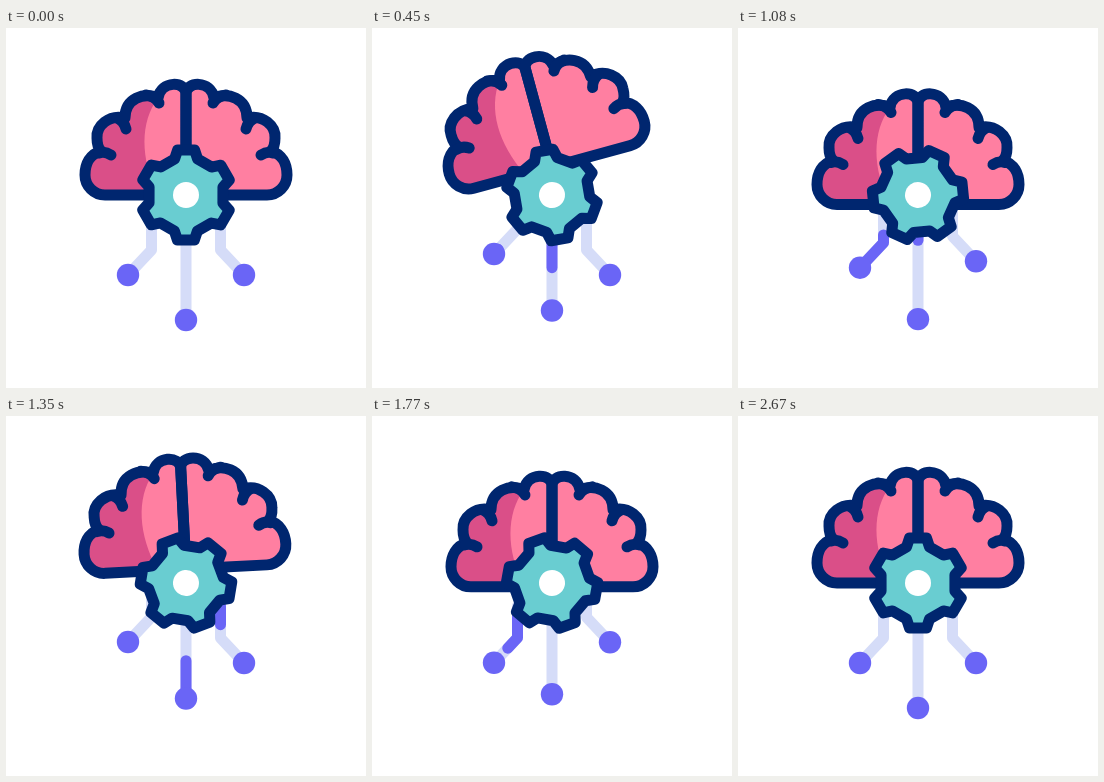
An HTML page that plays this animation: 360 px wide and 360 px high, repeating every 2.7 s.

```html
<!DOCTYPE html>
<html lang="en">
<head>
<meta charset="utf-8">
<title>Thinking brain</title>
<style>
  html, body { margin: 0; width: 100%; height: 100%; overflow: hidden; background: #fff; }
  svg { display: block; width: 100vw; height: 100vh; }
  path { stroke-linecap: round; stroke-linejoin: round; }
  .outline { fill: none; stroke: #00266f; stroke-width: 11; }
  .wire { fill: none; stroke: #d5dcf8; stroke-width: 11; }
  .pulse {
    fill: none; stroke: #6a65f6; stroke-width: 11;
    stroke-dasharray: 40 400; stroke-dashoffset: 45;
    animation: pulse 2700ms linear var(--pulse) infinite;
  }
  .node { fill: #6a65f6; }
  .branch { animation: bob 2700ms cubic-bezier(.37, 0, .63, 1) var(--bob) infinite; }
  .brain, .gear { transform-origin: 180px 167px; }
  .brain {
    animation: hop 2700ms cubic-bezier(.37, 0, .63, 1) infinite,
               tilt 2700ms cubic-bezier(.37, 0, .63, 1) infinite;
  }
  .gear { animation: spin 2700ms linear infinite; }

  @keyframes hop {
    0% { translate: 0 0; }
    20% { translate: 0 -30px; animation-timing-function: cubic-bezier(.6, 0, .6, 1); }
    40% { translate: 0 9.5px; }
    50.5% { translate: 0 -14px; }
    62.5% { translate: 0 4.5px; }
    75%, 100% { translate: 0 0; }
  }
  @keyframes tilt {
    0% { rotate: 0deg; }
    19.5% { rotate: -16deg; }
    30% { rotate: 4.3deg; }
    40% { rotate: 0deg; }
    50% { rotate: -3deg; }
    62%, 100% { rotate: 0deg; }
  }
  @keyframes spin {
    0% { rotate: 0deg; animation-timing-function: cubic-bezier(.4, .25, .7, .65); }
    16.67% { rotate: 110deg; }
    28.89% { rotate: 225deg; }
    40% { rotate: 324deg; }
    50% { rotate: 399deg; }
    65.56% { rotate: 520deg; }
    92.2%, 100% { rotate: 720deg; }
  }
  @keyframes bob {
    0%, 33.33%, 66.67%, 100% { translate: 0 0; }
    16.67%, 50% { translate: 0 -21px; }
  }
  @keyframes pulse {
    0%, 18.79%, 27.78%, 46.57%, 55.56%, 74.34%, 100% { stroke-dashoffset: 45; }
    18.78%, 46.56%, 74.33% { stroke-dashoffset: -107; }
  }
</style>
</head>
<body>
<svg viewBox="0 0 360 360">
  <defs>
    <path id="half" d="M180 66C180 53 155 52 152 70C138 64 119 70 119 90C103 86 90 98 91 110C91 116 92 120 95 123C84 126 79 136 79 147C79 158 88 167 99 167H180Z"/>
    <path id="folds" d="M140 67Q149 68 153 75M111 90Q118 93 120 101M93 125Q99 123 105 127"/>
    <g id="lines" class="outline">
      <use href="#half"/>
      <use href="#folds"/>
    </g>
  </defs>

  <g class="branch" style="--bob:0ms;--pulse:100ms">
    <path class="wire" d="M145.5 190V222L122 247"/>
    <path class="pulse" d="M145.5 190V222L122 247"/>
    <circle class="node" cx="122" cy="247" r="11.2"/>
  </g>
  <g class="branch" style="--bob:240ms;--pulse:237ms">
    <path class="wire" d="M180 190V292"/>
    <path class="pulse" d="M180 190V292"/>
    <circle class="node" cx="180" cy="292" r="11.2"/>
  </g>
  <g class="branch" style="--bob:450ms;--pulse:522ms">
    <path class="wire" d="M214.5 190V222L238 247"/>
    <path class="pulse" d="M214.5 190V222L238 247"/>
    <circle class="node" cx="238" cy="247" r="11.2"/>
  </g>

  <g class="brain">
    <g fill="#ff7fa1">
      <use href="#half"/>
      <use href="#half" transform="matrix(-1 0 0 1 360 0)"/>
    </g>
    <path fill="#da4f88" d="M152 70C138 64 119 70 119 90C103 86 90 98 91 110C91 116 92 120 95 123C84 126 79 136 79 147C79 158 88 167 99 167H152C134 130 134 94 152 70Z"/>
    <use href="#lines"/>
    <use href="#lines" transform="matrix(-1 0 0 1 360 0)"/>
  </g>

  <g class="gear">
    <path id="cog" class="outline" style="fill:#69cdd1"/>
    <circle cx="180" cy="167" r="13" fill="#fff"/>
  </g>
</svg>
<script>
  const tooth = [[-11.5, -36], [-8.5, -45], [8.5, -45], [11.5, -36]];
  const points = [];
  for (let i = 0; i < 6; i++) {
    const c = Math.cos(i * Math.PI / 3), s = Math.sin(i * Math.PI / 3);
    for (const [x, y] of tooth) {
      points.push(`${(180 + x * c - y * s).toFixed(2)} ${(167 + x * s + y * c).toFixed(2)}`);
    }
  }
  document.getElementById('cog').setAttribute('d', `M${points.join('L')}Z`);
</script>
</body>
</html>
```
